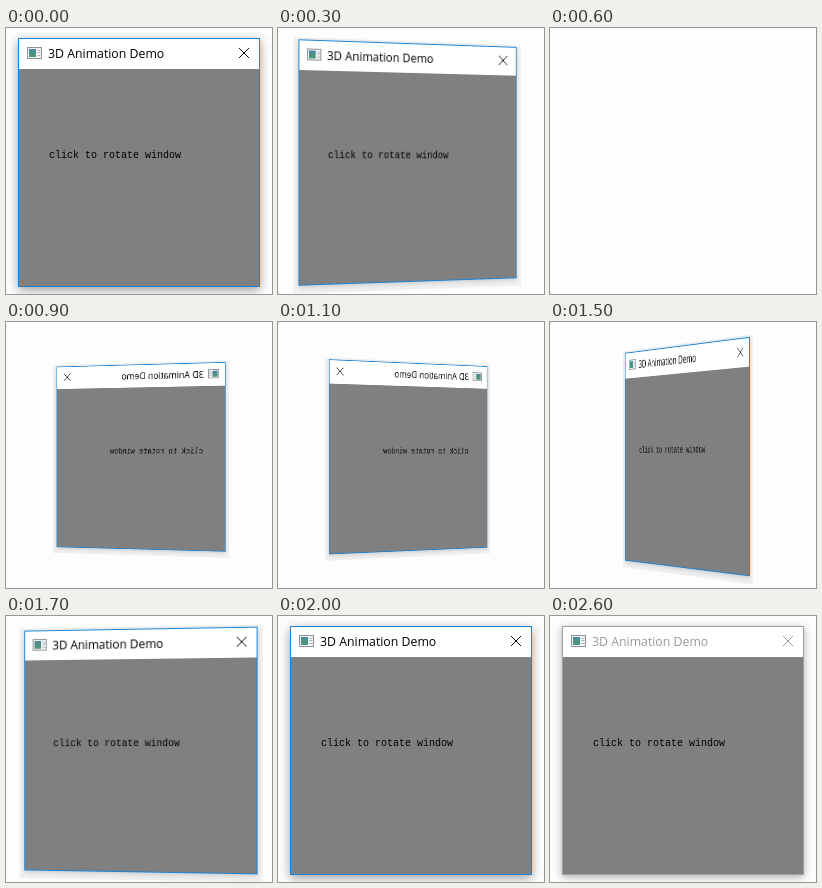
An HTML page that plays this animation: 266 by 266 pixels, repeating every 2800 ms.

```html
<!DOCTYPE html>
<html lang="en">
<head>
<meta charset="utf-8">
<title>Rotating window</title>
<style>
@property --turn { syntax: "<number>"; inherits: false; initial-value: 0; }

html, body { margin: 0; width: 100%; height: 100%; overflow: hidden; background: #fdfdfd; }

.stage {
  position: relative;
  width: 266px;
  height: 266px;
  overflow: hidden;
  perspective: 1250px;
  perspective-origin: 133px 136px;
}

/* The window backs away from the viewer until half a turn, then returns. */
.window {
  --turn: 0;
  position: absolute;
  left: 12px;
  top: 10px;
  width: 242px;
  height: 249px;
  box-sizing: border-box;
  border: 1px solid #1883d7;
  background: #808080;
  transform:
    translateZ(calc(min(var(--turn), 360 - var(--turn)) * -2.7px))
    rotateY(calc(var(--turn) * 1deg));
  animation: turn 2.8s infinite, frame 2.8s step-end infinite;
}

.bar { position: absolute; inset: 0 0 auto; height: 30px; background: #fff; }

.bar svg { position: absolute; left: 0; top: 0; }

.title, .close { color: #000; animation: focus 2.8s step-end infinite; }

.title {
  position: absolute;
  left: 29px;
  top: 5px;
  font: 12.3px/20px "Open Sans", "Noto Sans", sans-serif;
  white-space: pre;
}

.label {
  position: absolute;
  left: 30px;
  top: 109px;
  font: 10px/16px "Liberation Mono", "DejaVu Sans Mono", monospace;
  color: #000;
  white-space: pre;
}

@keyframes turn {
  0%      { --turn: 0;   animation-timing-function: step-end; }
  7.14%   { --turn: 3;   animation-timing-function: step-end; }
  10.71%  { --turn: 20;  animation-timing-function: steps(6, end); }
  32.14%  { --turn: 160; animation-timing-function: steps(4, end); }
  46.42%  { --turn: 260; animation-timing-function: steps(4, end); }
  60.71%  { --turn: 350; animation-timing-function: step-end; }
  64.28%  { --turn: 360; animation-timing-function: step-end; }
  100%    { --turn: 360; }
}

@keyframes frame {
  0%, 71.42% { border-color: #1883d7; box-shadow: 0 3px 10px rgba(0, 0, 0, .38); }
  7.14% {
    border-color: #1883d7;
    box-shadow: 0 2px 5px rgba(0, 0, 0, .15), 0 3px 0 5px rgba(0, 0, 0, .05);
  }
  92.85%, 100% { border-color: #a0a0a0; box-shadow: 0 2px 8px rgba(0, 0, 0, .32); }
}

@keyframes focus {
  0% { color: #000; }
  92.85%, 100% { color: #999; }
}
</style>
</head>
<body>
<div class="stage">
  <div class="window">
    <div class="bar">
      <svg width="240" height="30">
        <defs>
          <linearGradient id="pane" x2="0" y2="1">
            <stop offset="0" stop-color="#4c86a0"/>
            <stop offset="1" stop-color="#4c9a72"/>
          </linearGradient>
        </defs>
        <rect x="8.5" y="8.5" width="14" height="11" fill="#f4f4f4" stroke="#8c9398"/>
        <rect x="10" y="10" width="7" height="8" fill="url(#pane)"/>
        <path d="M18.5 11.5h3M18.5 13.5h3M18.5 16.5h3" stroke="#a9b4bc"/>
        <path class="close" d="M220 9l10 10M230 9l-10 10" stroke="currentColor" stroke-width=".95"/>
      </svg>
      <span class="title">3D Animation Demo</span>
    </div>
    <span class="label">click to rotate window</span>
  </div>
</div>
</body>
</html>
```
